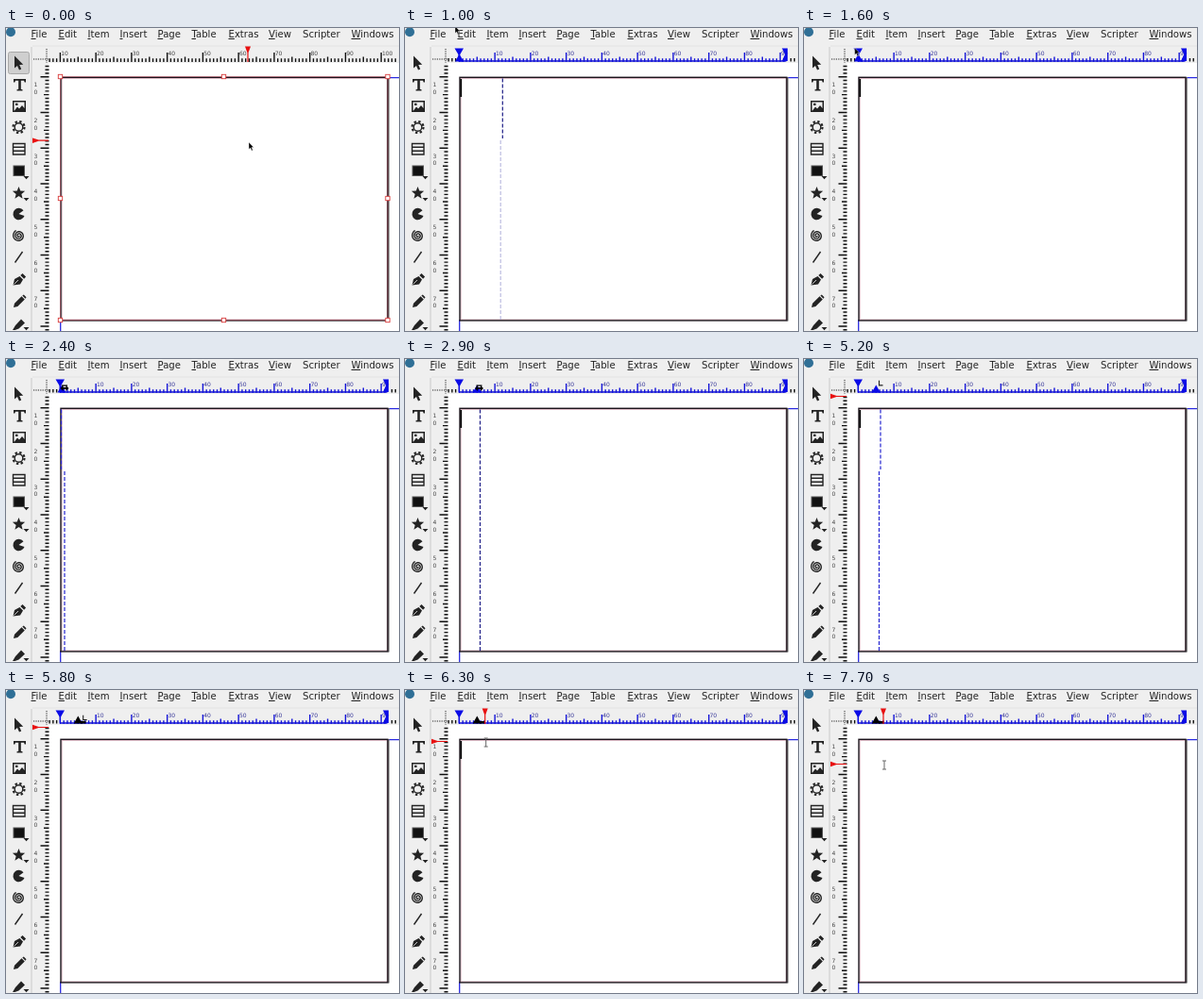
An HTML page for the animation above (8000 ms loop, 416 by 321 pixels).

```html
<!DOCTYPE html>
<html lang="en">
<head>
<meta charset="utf-8">
<title>Text frame indent</title>
<style>
  html, body { margin: 0; width: 100%; height: 100%; overflow: hidden; background: #efefef; }
  svg { display: block; width: 100vw; height: 100vh; }
  text { font-family: "DejaVu Sans", sans-serif; }
  .menu { font-size: 10.1px; fill: #222; }
  .num { font-size: 6px; fill: #444; }
  .blue .num { fill: #3a3a9a; }
  .ico { fill: #232323; stroke: none; }
  .pen { fill: none; stroke: #232323; stroke-width: 1.4; }
  .guide { fill: none; stroke-width: 1.2; stroke-dasharray: 4 2; }
</style>
</head>
<body>
<svg viewBox="0 0 416 321" preserveAspectRatio="none">
  <defs>
    <path id="more" d="M18.5 6h6l-3 3.2z"/>
  </defs>
  <rect width="416" height="321" fill="#efefef"/>
  <rect x="45.5" y="37" width="371" height="284" fill="#fff"/>
  <path d="M27 20V321" stroke="#c9c9c9"/>
  <path d="M28 19H416" stroke="#e2e2e2"/>
  <circle cx="5" cy="4.2" r="5" fill="#2f6f96"/>
  <g id="menu"></g>

  <g id="tools">
    <rect id="picked" x="2.5" y="25.5" width="22" height="23" rx="2" fill="#cfcfcf" stroke="#a8a8a8"/>
    <g class="ico">
      <path d="M9 29.5v13l3-2.6 2 4.6 2.2-1-2-4.5 4-.3z"/>
      <path d="M8 54h13v3.6h-1.3l-.7-1.8h-3.2v9l1.7.5v1.2h-6v-1.2l1.7-.5v-9H10l-.7 1.8H8z"/>
      <path fill-rule="evenodd" d="M7 77h14v12H7zM8.5 78.500v9h11v-9zM9 87.500l3-4 2 2 3-3.500 2.500 3v2.500zM10 79.800h2.500v2.200H10z"/>
    </g>
    <circle class="pen" cx="13.500" cy="105" r="4.300"/>
    <circle class="pen" cx="13.500" cy="105" r="6" stroke-dasharray="2.350 2.362" style="stroke-width:2.200"/>
    <path class="pen" d="M7.500 122.500h12.500v11.500H7.500zM7.500 126.300H20M7.500 130.200H20"/>
    <rect x="8" y="146" width="11.500" height="10.500" fill="#111" stroke="#555"/>
    <use href="#more" class="ico" y="151"/>
    <path id="star" class="ico"/>
    <use href="#more" class="ico" y="174"/>
    <path class="ico" d="M13.500 197L18.500 193.200A6.200 6.200 0 1 0 19.500 199z"/>
    <path id="spiral" class="pen"/>
    <path class="pen" d="M9.500 248.500L17.500 237"/>
    <g class="ico">
      <path d="M7.500 272.500l1.500-6.500 5.500-3 3.500 3.500-3 5zM15.300 262l2.200-2 3.600 3.600-2 2.200z"/>
      <path d="M8 296l1-4.200 7.500-7.500 3.300 3.300-7.500 7.500zM17.300 283.500l1.500-1 2.700 2.700-1 1.500z"/>
      <path d="M7 320l3-5 6-6.500 4 4-6.500 6-4 1.500z"/>
    </g>
    <path d="M8.500 271.500l4.500-4.500" stroke="#efefef" stroke-width=".8"/>
    <use href="#more" class="ico" y="311"/>
  </g>

  <path d="M29 33H45M43 22V37" stroke="#222" stroke-dasharray="1.200 1.200"/>
  <g id="vruler"></g>
  <g id="plain"></g>
  <g id="edit" class="blue"></g>

  <path d="M57.700 309V321M404 52.700H416" stroke="#2a2ae0" stroke-width="1.300"/>
  <g fill="none">
    <rect x="59.200" y="53.500" width="344.300" height="255.300" stroke="#dbb9c4"/>
    <path d="M405 52V310.500" stroke="#777" stroke-width="1.600"/>
    <rect x="58" y="52.300" width="346" height="257.600" stroke="#1c141c" stroke-width="1.400"/>
  </g>
  <g id="handles"></g>

  <path id="upper" class="guide"/>
  <path id="lower" class="guide"/>
  <path id="caret" d="M59.300 54V73" stroke="#000" stroke-width="1.700"/>

  <path id="topMark" d="M-3 19.500H3L.6 26V36H-.6V26z" fill="#e81010"/>
  <path id="sideMark" d="M28 -2.800L34.500 -.6H45V.6H34.500L28 2.800z" fill="#e81010"/>

  <g id="arrow"><path d="M0 0V7.500L1.700 6 3 9 4.300 8.400 3 5.500H5.200z" fill="#000" stroke="#fff" stroke-width=".4"/></g>
  <g id="beam"><path d="M-2 -4.500H2M0 -4.500V4.500M-2 4.500H2" fill="none" stroke="#666"/></g>
  <g id="drag"><path d="M-4.500 0L-1.500 -3V-1H1.500V-3L4.500 0 1.500 3V1H-1.500V3zM-3 -3.500H3V-2.300H-3z" fill="#000"/></g>
  <g id="tab"><path d="M-1 -3V2H3" fill="none" stroke="#222" stroke-width="1.100"/></g>
</svg>
<script>
const $ = id => document.getElementById(id);
const LOOP = 8000, ZERO = 57.4, STEP = 3.775, LEFT = 57, RIGHT = 403.5;

// static parts
const menus = [["File", 26.5], ["Edit", 55.5], ["Item", 86.5], ["Insert", 120.5], ["Page", 160.5],
  ["Table", 196.5], ["Extras", 235.5], ["View", 278], ["Scripter", 314], ["Windows", 365.5]];
$("menu").innerHTML = menus.map(([word, x]) =>
  `<text class="menu" x="${x}" y="10">` + (word === "Scripter" ? word :
  `<tspan text-decoration="underline">${word[0]}</tspan>${word.slice(1)}`) + "</text>").join("");

const polar = (r, a, cx, cy) => (cx + r * Math.cos(a)).toFixed(2) + " " + (cy + r * Math.sin(a)).toFixed(2);
$("star").setAttribute("d", "M" + Array.from({ length: 10 }, (_, i) =>
  polar(i % 2 ? 3 : 7, (i / 5 - 0.5) * Math.PI, 13.5, 175)).join("L") + "z");
$("spiral").setAttribute("d", "M" + Array.from({ length: 61 }, (_, i) =>
  polar(0.5 + i * 0.095, i * 0.28, 13.5, 220)).join("L"));

// tick marks between two positions; draw(p, level) returns one path piece
function ticks(from, to, origin, draw) {
  let d = "";
  for (let i = Math.ceil((from - origin) / STEP); origin + i * STEP <= to; i++)
    d += draw((origin + i * STEP).toFixed(2), i % 10 === 0 ? 2 : i % 5 === 0 ? 1 : 0);
  return d;
}
const path = (d, color, w) => `<path d="${d}" stroke="${color}" stroke-width="${w}" fill="none"/>`;
const down = (x, level) => `M${x} ${[32.3, 30.5, 26][level]}V36`;
const short = x => `M${x} 32V35.500`;
const across = (y, level) => `M${[41.5, 40, 36.5][level]} ${y}H45.500`;
const label = (n, x, y) => `<text class="num" x="${x}" y="${y}">${n}</text>`;

let side = path(ticks(37, 321, 51.8, across), "#111", 1.4);
for (let i = 0; i < 7; i++) {
  const y = 62 + i * STEP * 10;
  side += label(i + 1, 29.5, y) + label(0, 29.5, y + 7.8);
}
$("vruler").innerHTML = side;

let plain = path(ticks(46, 416, ZERO, down), "#111", 1.4);
let edit = path(ticks(LEFT, RIGHT, ZERO, down) + `M${LEFT} 35H${RIGHT}`, "#1414d8", 1.4) +
  path(ticks(46, LEFT - 1, ZERO, short) + ticks(RIGHT + 3, 416, ZERO, short), "#111", 1.4);
for (let i = 0; i < 10; i++) {
  const x = ZERO + i * STEP * 10 + 0.8;
  plain += label((i + 1) * 10, x, 29);
  if (i) edit += label(i * 10, x, 28.5);
}
$("plain").innerHTML = plain;
$("edit").innerHTML = edit +
  '<path d="M52.500 21.500H62L58 28.500V35H56.700V28.500z" fill="#0a0ae6"/>' +
  '<path d="M399 21.500H405V35H399L402.200 28z" fill="#0a0ae6"/>' +
  '<path id="indent" d="M0 27.500L4.500 35.500H-4.500z"/>' +
  '<path id="base" d="M79 33H84.500V35.500H79z" fill="#000"/>';

let grips = '<rect x="57.500" y="51.500" width="346.500" height="258" fill="none" stroke="#c05060" stroke-width=".5"/>';
for (const x of [57.5, 230.5, 404])
  for (const y of [51.5, 180.5, 309.5])
    if (x !== 230.5 || y !== 180.5)
      grips += `<rect x="${x - 2.2}" y="${y - 2.2}" width="4.400" height="4.400" fill="#fff" stroke="#d83a3a" stroke-width=".9"/>`;
$("handles").innerHTML = grips;

// motion: rows of [time, ...values], linear in between
function at(rows, t) {
  let i = rows.length - 1;
  while (i > 0 && rows[i][0] > t) i--;
  const a = rows[i], b = rows[i + 1];
  if (!b || t < a[0]) return a.slice(1);
  const k = (t - a[0]) / (b[0] - a[0]);
  return a.slice(1).map((v, j) => v + (b[j + 1] - v) * k);
}
const mouse = [[0, 257, 121], [600, 257, 121], [800, 172, 68], [900, 103, 30], [1000, 53, -2],
  [1500, 53, 19], [2100, 57, 31], [2300, 57, 31], [2400, 62, 31], [2900, 78.500, 31], [3000, 78.500, 31],
  [3100, 80, 31], [3500, 80, 31], [3900, 80.500, 31], [4700, 80.500, 31], [5000, 80.500, 26], [5700, 80.500, 25.500],
  [6000, 87, 38], [6300, 85.700, 55.500], [6600, 85.700, 66], [7100, 85, 83], [7200, 85, 83], [7400, 85, 79.500]];
const upperX = [[2100, 58.500], [2400, 58.500], [2500, 63], [2900, 79.500], [3500, 79.500], [3900, 81]];
const lowerX = [[2400, 62], [2900, 79.500], [3500, 79.500], [3900, 80.500], [4300, 80.500], [4500, 79.500]];
const caretOn = [[500, 1100], [1600, 2100], [2700, 3300], [3800, 4400], [4900, 5400], [5900, 6600], [7100, 7700]];

const show = (id, on) => { $(id).style.display = on ? "" : "none"; };
const move = (id, x, y) => $(id).setAttribute("transform", `translate(${x.toFixed(2)} ${y.toFixed(2)})`);
const within = (t, a, b) => t >= a && t < b;

function guide(id, x, y1, y2, color, on) {
  show(id, on);
  $(id).setAttribute("d", `M${x} ${y1}V${y2}`);
  $(id).setAttribute("stroke", color);
}

function draw(t) {
  const editing = t >= 500;
  show("picked", !editing);
  show("handles", !editing);
  show("plain", !editing);
  show("edit", editing);
  show("caret", caretOn.some(([a, b]) => within(t, a, b)));

  const [x, y] = at(mouse, t);
  const kind = t < 500 ? "arrow" : t < 900 ? "beam" : t < 2000 ? "arrow" :
    t < 4900 ? "drag" : t < 6000 ? "tab" : "beam";
  for (const id of ["arrow", "beam", "drag", "tab"]) show(id, id === kind);
  move(kind, x, y);

  const early = within(t, 900, 1100);
  const ink = early || within(t, 2900, 3600) ? "#1c1c86" : "#2424d0";
  guide("upper", early ? 103.3 : at(upperX, t)[0], 53.5, 117, ink, early || within(t, 2100, 5800));
  guide("lower", early ? 101.2 : at(lowerX, t)[0], 119, 309, early ? "#bcbce0" : ink, early || within(t, 2400, 5800));

  move("indent", t < 2400 ? 57.5 : Math.min(at(lowerX, t)[0] - 3, 76.3), 0);
  $("indent").setAttribute("fill", t < 5800 ? "#0a0ae6" : "#000");
  show("base", t >= 5800);

  show("topMark", t < 900 || t >= 5900);
  move("topMark", x - 1, 0);
  show("sideMark", t < 900 || t >= 4100);
  move("sideMark", 0, t < 900 ? y - 1.8 : Math.max(39.5, y - 1));
}

function tick() {
  const t = performance.now() % LOOP;
  draw(Math.floor(t / 100) * 100);
  requestAnimationFrame(tick);
}
tick();
</script>
</body>
</html>
```
